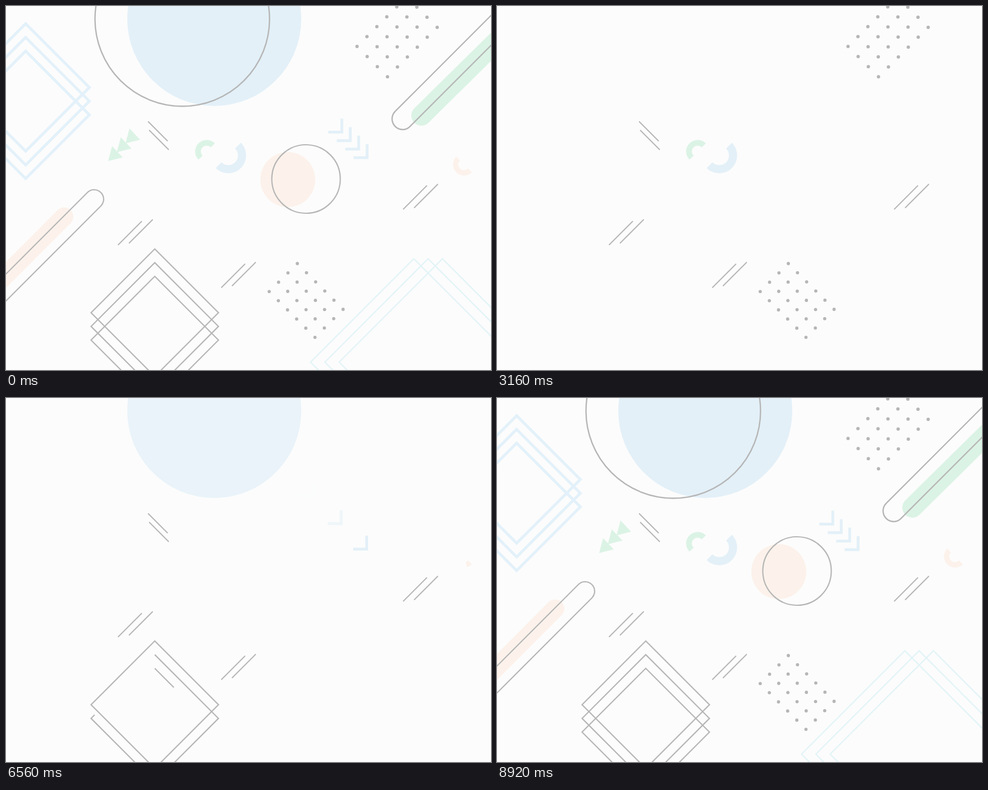
An HTML page that plays this animation: 864x648 px, repeating every 10000 ms.

```html
<!DOCTYPE html>
<html lang="en">
<head>
<meta charset="utf-8">
<title>Geometric background</title>
<style>
  html, body { margin: 0; width: 100%; height: 100%; overflow: hidden; background: #fcfcfc; }
  svg { display: block; width: 100%; height: 100%; }
</style>
</head>
<body>
<svg viewBox="0 0 864 648" fill="none"></svg>
<script>
const LOOP = 10000, HALF = 5040;
const GRAY = '#b6b6b6', BLUE = '#e3f0f8', SKY = '#e3f1fa', CYAN = '#e3f4f7', GREEN = '#dbf3e5', PEACH = '#fcf2eb';
const stage = document.querySelector('svg');
const parts = [];

const ease = u => u <= 0 ? 0 : u >= 1 ? 1 : u < .5 ? 2 * u * u : 1 - 2 * (1 - u) ** 2;

// How present a part is (0..1); times = [leave, leave duration, enter, enter duration]
const presence = (t, [out, outLen, back, backLen]) =>
  t < HALF ? 1 - ease((t - out) / outLen) : ease((t - back) / backLen);

function add(tag, attrs, times, update) {
  const el = document.createElementNS('http://www.w3.org/2000/svg', tag);
  for (const key in attrs) el.setAttribute(key, attrs[key]);
  stage.append(el);
  parts.push({ el, times, update });
}

// A line that draws itself from its start and is erased from its end
function drawn(d, stroke, width, times) {
  add('path', { d, stroke, 'stroke-width': width, pathLength: 1, 'stroke-miterlimit': 8 }, times, (el, v) => {
    el.style.visibility = v > 0 ? 'visible' : 'hidden';
    el.setAttribute('stroke-dasharray', v < 1 ? `${v} 2` : 'none');
  });
}

function slide(attrs, dx, dy, fades, times) {
  add('path', attrs, times, (el, v) => {
    el.setAttribute('transform', `translate(${dx * (1 - v)} ${dy * (1 - v)})`);
    el.setAttribute('opacity', fades ? v : +(v > 0));
  });
}

const disc = (cx, cy, r, fill, times) =>
  add('circle', { cx, cy, r, fill }, times, (el, v) => el.setAttribute('opacity', v));

const ring = (cx, cy, r, sweep, width, times) => drawn(
  `M${cx - r} ${cy}A${r} ${r} 0 0 ${sweep} ${cx + r} ${cy}A${r} ${r} 0 0 ${sweep} ${cx - r} ${cy}Z`, GRAY, width, times);

// Half circle, clockwise from the given angle
function halfRing(cx, cy, r, degrees, stroke, width, times) {
  const a = degrees * Math.PI / 180, x = r * Math.cos(a), y = r * Math.sin(a);
  drawn(`M${cx + x} ${cy + y}A${r} ${r} 0 0 1 ${cx - x} ${cy - y}`, stroke, width, times);
}

const fromTop = (x, y, h) => `M${x} ${y}l${h} ${h}l${-h} ${h}l${-h} ${-h}Z`;
const fromLeft = (x, y, h) => `M${x} ${y}l${h} ${-h}l${h} ${h}l${-h} ${h}Z`;

function dots(x, y, a, b, columns, rows, r, out, back, span) {
  const last = columns + rows - 2;
  for (let i = 0; i < columns; i++) for (let j = 0; j < rows; j++) {
    const delay = (i + j) / last * span;
    add('circle', { cx: x + i * a[0] + j * b[0], cy: y + i * a[1] + j * b[1], fill: GRAY },
      [out + delay, 280, back + delay, 280], (el, v) => el.setAttribute('r', r * v));
  }
}

// Soft fills
disc(371, 23, 155, BLUE, [800, 800, 6050, 800]);
disc(502, 309, 49, PEACH, [2120, 700, 6800, 800]);
slide({ d: 'M740 195L942 -4', stroke: GREEN, 'stroke-width': 36, 'stroke-linecap': 'round' },
  160, -160, false, [2100, 1000, 6874, 1000]);
slide({ d: 'M103.500 375L-100 579', stroke: PEACH, 'stroke-width': 33, 'stroke-linecap': 'round' },
  -160, 160, false, [2120, 680, 6805, 1000]);

// Nested diamonds
for (let i = 0; i < 3; i++) {
  const drop = i * 24.4;
  drawn(fromTop(35, 31.5 + drop, 113.5), SKY, 5, [215 + i * 500, 1000, 7120 + i * 450, 900]);
  drawn(fromTop(265, 432.5 + drop, 113.5), GRAY, 2.2, [640 + i * 384, 1000, 5352 + i * 500, 1080]);
  drawn(fromLeft(542.5 + i * 25.5, 634, 184), CYAN, 2.4,
    [1700 - i * 435, 1000, [7616, 7255, 6750][i], 1000]);
}

// Rings and capsules
ring(314, 23, 155.5, 0, 2.4, [1504, 1000, 6690, 1000]);
ring(534.5, 308, 61, 1, 2.2, [1296, 1000, 7276, 1000]);
drawn('M157 327A17 17 0 0 1 169 356L-38 563A17 17 0 0 1 -62 539L145 332A17 17 0 0 1 157 327Z',
  GRAY, 2.2, [1584, 1000, 7660, 1200]);
drawn('M706.500 220A19 19 0 0 1 693.200 187.700L893.200 -12.300A19 19 0 0 1 919.800 14.300L719.800 214.300A19 19 0 0 1 706.500 220Z',
  GRAY, 2.4, [900, 1000, 7680, 640]);

// Half rings
halfRing(357.5, 259, 15.5, 135, GREEN, 10, [3420, 800, 6750, 800]);
halfRing(396, 266, 24.5, -45, BLUE, 14.5, [3600, 800, 6976, 800]);
halfRing(816, 282, 15, 45, PEACH, 9.5, [1000, 800, 6330, 800]);

// Triangles and chevrons fly off one after another and return in reverse order
for (let i = 0; i < 3; i++)
  slide({ d: `M${220 - i * 15.5} ${218 + i * 15.7}l19 20l-26 6.500Z`, fill: GREEN },
    68, -68, true, [2240 + i * 200, 540, 7100 - i * 200, 500]);
for (let i = 0; i < 4; i++)
  slide({ d: `M${574.3 + i * 15} ${224.6 + i * 15.1}h24v-24`, stroke: BLUE, 'stroke-width': 5 },
    -68, -68, true, [2060 + i * 205, 500, 6700 - i * 200, 500]);

// Pairs of short strokes
for (const [x, y] of [[445, 456], [426, 459], [261.5, 380], [242, 383], [769.5, 317], [750, 319.5]])
  drawn(`M${x} ${y}l-42.500 42.500`, GRAY, 2, [4380, 540, x === 445 ? 5120 : 5160, 540]);
for (const [x, y] of [[253, 205.5], [255, 221]])
  drawn(`M${x} ${y}l35 35`, GRAY, 2, [4380, 540, 5160, 540]);

// Dot grids
dots(625.3, 72, [17.7, -17.6], [18.1, 18], 6, 4, 3, 3400, 7700, 290);
dots(519, 458.5, [16.3, 16.3], [-16.7, 16.6], 6, 4, 2.9, 3700, 8240, 400);

function frame(now) {
  const t = now % LOOP;
  for (const { el, times, update } of parts) update(el, presence(t, times));
  requestAnimationFrame(frame);
}
const start = performance.now();
frame(0);
requestAnimationFrame(function run() {
  const t = (performance.now() - start) % LOOP;
  for (const { el, times, update } of parts) update(el, presence(t, times));
});
</script>
</body>
</html>
```
